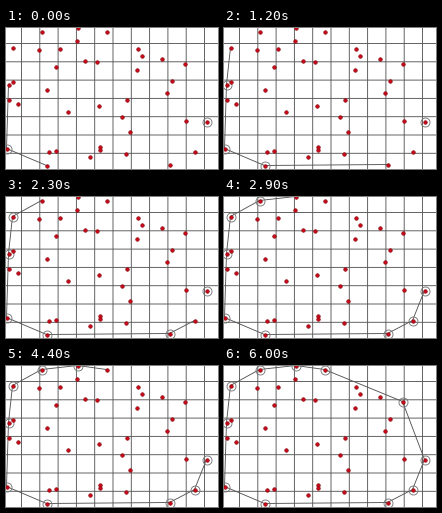
A matplotlib script for the animation above (6.4 s loop, 212x141 px).

```python
import matplotlib.pyplot as plt
import numpy as np
from matplotlib.animation import FuncAnimation
from matplotlib.path import Path

W, H, DPI = 212, 141, 64
FRAMES, INTERVAL = 64, 100
FIRST_STEP, STEP = 4.95, 10.4   # in ticks of 100 ms
PX = 72 / DPI                   # one pixel in points
CELL = 18.3
INNER_DOTS = 28

# Both halves of the convex hull, from leftmost to rightmost point
UPPER = np.array([(1, 121), (3, 57), (7, 20), (36, 4), (72, 0), (101, 4),
                  (179, 36), (201, 94)])
LOWER = np.array([UPPER[0], (41, 138), (164, 137), (189, 124), UPPER[-1]])
HULL = np.vstack([UPPER, LOWER[-2:0:-1]])


def scatter_inside(polygon, count, seed):
    """Random points in the polygon, a little denser on the left."""
    rng = np.random.default_rng(seed)
    area = Path(polygon)
    points = []
    while len(points) < count:
        u, v = rng.random(2)
        p = (W * u ** 1.2, H * v)
        if area.contains_point(p):
            points.append(p)
    return np.array(points)


def stroke(line, **style):
    line.set(snap=False, **style)
    return line


fig = plt.figure(figsize=(W / DPI, H / DPI), dpi=DPI, facecolor="white")
ax = fig.add_axes([0, 0, 1, 1])
ax.set_xlim(0.5, W + 0.5)
ax.set_ylim(H + 0.5, 0.5)
ax.axis("off")

grid = dict(color="#555555", lw=0.9 * PX, zorder=1)
for pos in np.arange(16, W, CELL):
    stroke(ax.axvline(pos), **grid)
    if pos < H:
        stroke(ax.axhline(pos), **grid)

edges = [stroke(ax.plot([], [])[0], color="#555555", lw=0.9 * PX, zorder=2)
         for _ in range(2)]
rings, = ax.plot([], [], "o", ms=9 * PX, mfc="none", mec="#777777",
                 mew=0.9 * PX, zorder=3)
dots = np.vstack([HULL, scatter_inside(HULL, INNER_DOTS, seed=7)])
ax.plot(*dots.T, "o", ms=3.6 * PX, mfc="#c80816", mec="#8c0a14",
        mew=0.6 * PX, zorder=4)


def draw(i):
    step = int((i - FIRST_STEP) // STEP) + 1
    for line, chain in zip(edges, (UPPER, LOWER)):
        line.set_data(*chain[:step + 2].T)
    marked = np.vstack([UPPER[:step + 1], LOWER[:step + 1], UPPER[-1:]])
    rings.set_data(*np.unique(marked, axis=0).T)
    return [*edges, rings]


anim = FuncAnimation(fig, draw, frames=FRAMES, interval=INTERVAL,
                     repeat=True, repeat_delay=0, blit=False)
plt.show()
```
